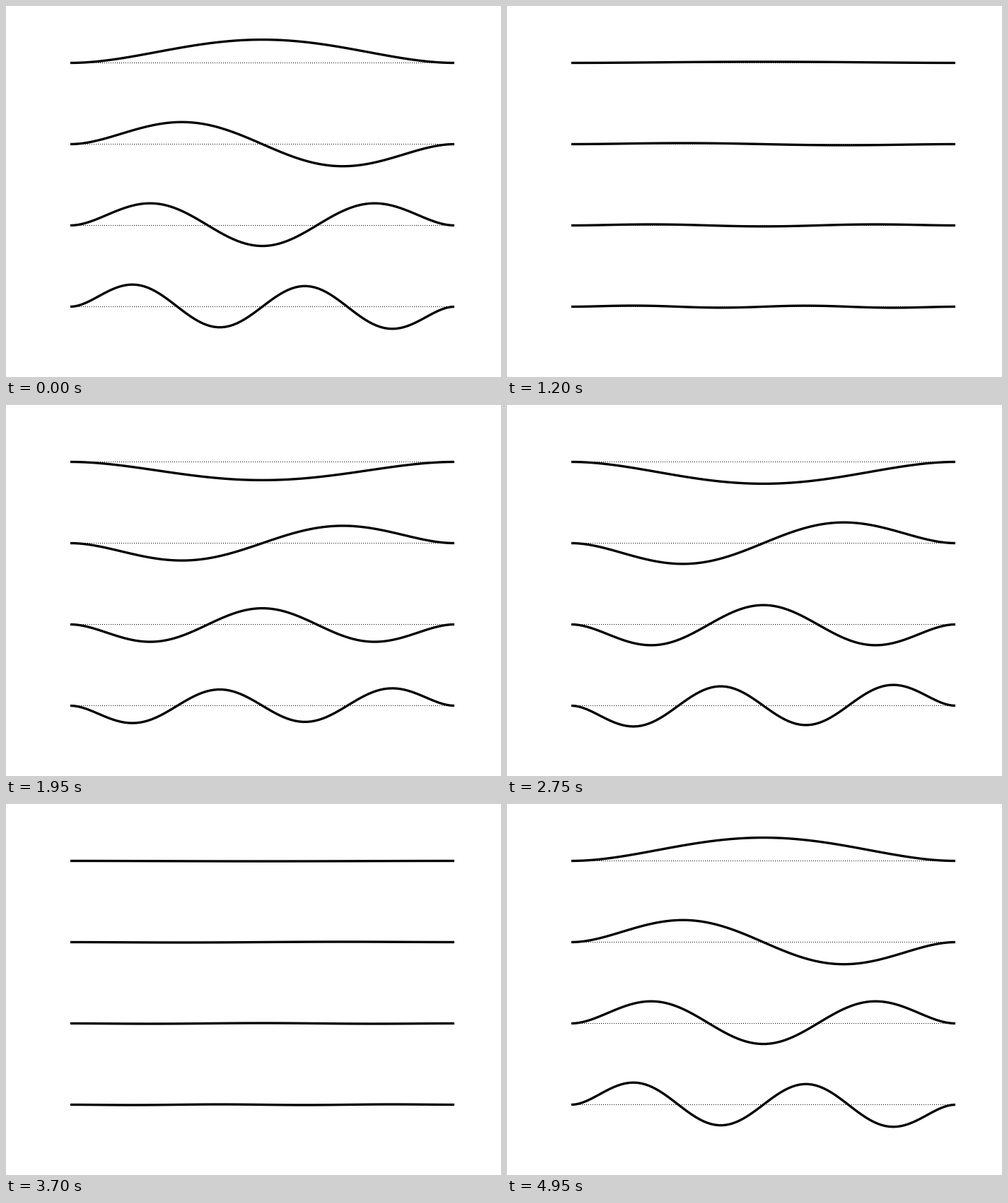
A matplotlib script that plays this animation: 700 px wide and 525 px high, repeating every 5 s.

```python
import numpy as np
import matplotlib.pyplot as plt
from matplotlib.animation import FuncAnimation

plt.rcParams["path.simplify"] = False

WIDTH, HEIGHT, DPI = 700, 525, 100
PX = 72 / DPI                       # one pixel in points
FRAMES, INTERVAL = 100, 50
LEFT, RIGHT = 91, 634
FIRST_Y, SPACING = 80.5, 115
SCALE = 20.7                        # pixels per unit of deflection
ROOTS = [4.730041, 7.853205, 10.995608, 14.137165]


def clamped_mode(root, s):
    """Bending mode of a beam clamped at both ends, s in 0..1."""
    ratio = (np.cosh(root) - np.cos(root)) / (np.sinh(root) - np.sin(root))
    z = root * s
    return np.cosh(z) - np.cos(z) - ratio * (np.sinh(z) - np.sin(z))


fig = plt.figure(figsize=(WIDTH / DPI, HEIGHT / DPI), dpi=DPI, facecolor="white")
ax = fig.add_axes([0, 0, 1, 1])
ax.set_xlim(0, WIDTH)
ax.set_ylim(HEIGHT, 0)
ax.axis("off")

s = np.linspace(0, 1, 100)
x = LEFT + (RIGHT - LEFT) * s
beams = []
for i, root in enumerate(ROOTS):
    rest = FIRST_Y + SPACING * i
    ax.plot([LEFT, RIGHT], [rest, rest], color="black", lw=PX,
            dashes=(1, 2), dash_capstyle="butt", snap=False)
    line, = ax.plot([], [], color="black", lw=3.33 * PX,
                    solid_capstyle="butt", solid_joinstyle="round", snap=False)
    beams.append((line, rest, SCALE * clamped_mode(root, s)))


def update(frame):
    # Both ends of the loop hold the same pose.
    swing = np.cos(2 * np.pi * frame / (FRAMES - 1))
    for line, rest, shape in beams:
        line.set_data(x, rest - swing * shape)
    return [line for line, _, _ in beams]


anim = FuncAnimation(fig, update, frames=FRAMES, interval=INTERVAL,
                     repeat=True, repeat_delay=0)
plt.show()
```
